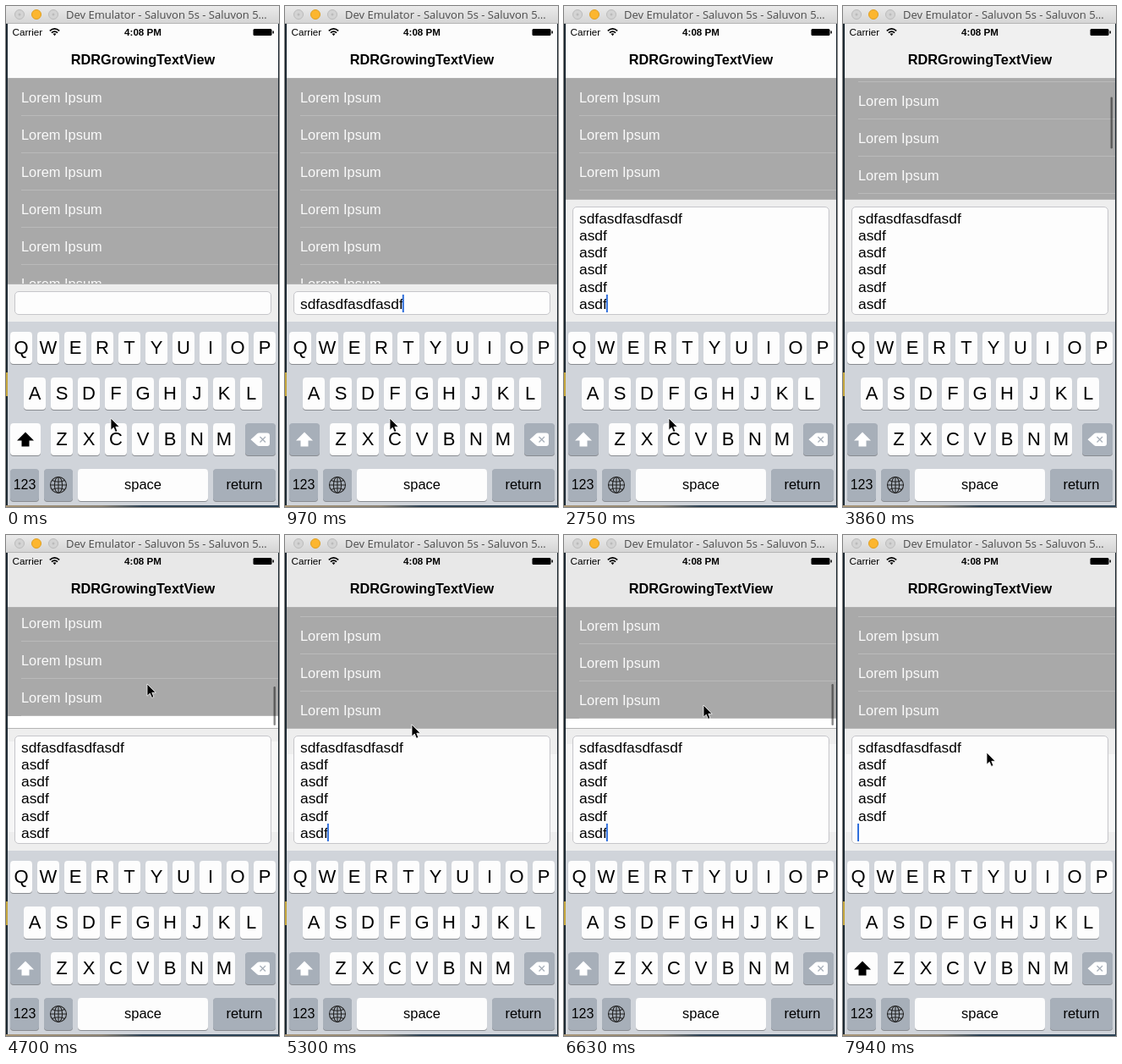
Animation of 323 by 592 pixels, one loop 8000 ms. Source, as an HTML page:

```html
<!DOCTYPE html>
<html lang="en">
<head>
<meta charset="utf-8">
<title>Growing text view</title>
<style>
  html, body { margin: 0; width: 100%; height: 100%; overflow: hidden; }
  svg { display: block; width: 323px; height: 592px; font-family: "Liberation Sans", Arial, sans-serif; }
  text { white-space: pre; }
  .mid { text-anchor: middle; }
</style>
</head>
<body>
<svg id="stage" viewBox="0 0 323 592">
  <defs>
    <linearGradient id="chrome" x2="0" y2="1">
      <stop stop-color="#ebebeb"/><stop offset="1" stop-color="#d5d5d5"/>
    </linearGradient>
    <linearGradient id="desk">
      <stop stop-color="#a99678"/><stop offset=".35" stop-color="#8b8272"/><stop offset=".5" stop-color="#2b4154"/>
    </linearGradient>
    <clipPath id="view"><rect id="viewBox" x="2" y="86" width="320"/></clipPath>
  </defs>
  <rect width="323" height="592" fill="#1c2831"/>
  <rect y="433" width="2" height="28" fill="#c4a53c"/>
  <rect y="590" width="323" height="2" fill="url(#desk)"/>
  <rect x="2" y="20" width="320" height="570" fill="#fff"/>

  <g clip-path="url(#view)"><g id="list"></g></g>
  <rect id="thumb" x="316.5" width="2.5" rx="1.25" fill="#000" opacity=".45"/>

  <rect id="nav" x="2" y="20" width="320" height="65"/>
  <rect x="2" y="85" width="320" height="1" fill="#b0b0b0"/>
  <text x="7.5" y="35" font-size="11.7">Carrier</text>
  <g fill="none" stroke="#000" stroke-width="1.7">
    <path d="M51.8 29.3Q57.5 24.5 63.2 29.3M53.9 31.7Q57.5 28.7 61.1 31.7"/>
    <path d="M55.5 32.8Q57.5 31.6 59.5 32.8L57.5 35.2Z" fill="#000" stroke="none"/>
  </g>
  <text class="mid" x="162" y="35" font-size="11.6" font-weight="bold">4:08 PM</text>
  <rect x="292.5" y="27" width="22" height="8" rx="1.5"/>
  <rect x="315.4" y="29.5" width="1.5" height="3"/>
  <text class="mid" x="162" y="69" font-size="16.3" font-weight="bold">RDRGrowingTextView</text>

  <rect width="323" height="20" fill="url(#chrome)"/>
  <rect y="20" width="323" height="1" fill="#b5b5b5"/>
  <circle cx="16" cy="10" r="5.5" fill="#d3d3d3" stroke="#bcbcbc"/>
  <circle cx="36" cy="10" r="5.5" fill="#fcb62f" stroke="#dfa023"/>
  <circle cx="56" cy="10" r="5.5" fill="#d3d3d3" stroke="#bcbcbc"/>
  <circle cx="16" cy="10" r="1.5" fill="#bbb"/>
  <circle cx="56" cy="10" r="1.5" fill="#bbb"/>
  <text x="71" y="15" font-size="13" fill="#4b4b4b" style="font-family:'Open Sans',sans-serif">Dev Emulator - Saluvon 5s - Saluvon 5…</text>

  <rect id="bar" x="2" width="320" fill="#eee"/>
  <rect id="glow" x="2" width="320" fill="#f6f6f6"/>
  <rect id="barLine" x="2" width="320" height="1" fill="#b4b4b4"/>
  <rect id="field" x="10.5" width="303" rx="4.5" fill="#fdfdfd" stroke="#c6c6ca"/>
  <g id="lines" font-size="17.4"></g>
  <rect id="caret" y="341" width="2" height="21" fill="#2f6fdc"/>

  <rect x="2" y="373" width="320" height="217" fill="#d0d4da"/>
  <g id="keys"></g>
  <path id="arrow" d="M23 503.5L33 513.5H27.5V520.5H18.5V513.5H13Z"/>
  <path d="M289.5 512.3L297 505.5Q298 504.5 299.5 504.5H309Q312 504.5 312 507.5V517Q312 520 309 520H299.5Q298 520 297 519Z" fill="#fff"/>
  <path d="M300.5 509L307 515.5M307 509L300.5 515.5" stroke="#a7afb9" stroke-width="1.3"/>
  <g fill="none" stroke="#222" stroke-width="1.1">
    <circle cx="62" cy="566" r="9.5"/><ellipse cx="62" cy="566" rx="4.6" ry="9.5"/>
    <path d="M62 556.5V575.5M52.5 566H71.5M54.5 560.5Q62 564 69.5 560.5M54.5 571.5Q62 568 69.5 571.5"/>
  </g>
  <path id="mouse" d="M0 0V14.2L3.3 11.2L5.5 16.4L7.9 15.4L5.8 10.3H10.2Z" stroke="#fff" stroke-width=".8"/>
</svg>
<script>
const LOOP = 8000, TOP = 86, ROW = 44, ROWS = 8, REST = 209;
const $ = id => document.getElementById(id);

function add(parent, tag, attrs, content = '') {
  const node = document.createElementNS('http://www.w3.org/2000/svg', tag);
  set(node, attrs);
  node.textContent = content;
  return parent.appendChild(node);
}
function set(node, attrs) {
  for (const name in attrs) node.setAttribute(name, attrs[name]);
}
const show = (node, on) => set(node, { visibility: on ? 'visible' : 'hidden' });
const within = (t, a, b) => t >= a && t < b;
const progress = (t, a, b) => Math.min(1, Math.max(0, (t - a) / (b - a)));
const smooth = k => k * k * (3 - 2 * k);

add($('list'), 'rect', { x: 2, width: 320, height: ROW * ROWS, fill: '#a9a9a9' });
for (let y = 0; y < ROW * ROWS; y += ROW) {
  add($('list'), 'rect', { x: 18, y: y + 43, width: 304, height: 1, fill: '#bababa' });
  add($('list'), 'text', { x: 18, y: y + 27.5, 'font-size': 16.4, fill: '#fafafa' }, 'Lorem Ipsum');
}

const WHITE = '#fdfdfd', GRAY = '#a7afb9';
function key(x, y, width, label, fill = WHITE, size = 22) {
  add($('keys'), 'rect', { x, y: y + 1, width, height: 38, rx: 4, fill: '#898c91' });
  const face = add($('keys'), 'rect', { x, y, width, height: 38, rx: 4, fill });
  add($('keys'), 'text', { class: 'mid', x: x + width / 2, y: y + 18.5 + size * .36, 'font-size': size }, label);
  return face;
}
['QWERTYUIOP', 'ASDFGHJKL', 'ZXCVBNM'].forEach((row, r) =>
  [...row].forEach((letter, i) => key(162 - 16 * row.length + 3 + 32 * i, 385 + 54 * r, 26, letter)));
const shiftKey = key(5, 493, 36, '');
key(283, 493, 36, '', GRAY);
key(5, 547, 34, '123', GRAY, 16);
key(45, 547, 34, '', GRAY);
key(85, 547, 154, 'space', WHITE, 16.5);
key(245, 547, 74, 'return', GRAY, 16.5);

const lineNodes = Array.from({ length: 6 }, () => add($('lines'), 'text', { x: 18 }));

// Typing comes in bursts of evenly spaced strokes
const strokes = [];
const type = (start, gap, text) =>
  [...text].forEach((char, i) => strokes.push({ char, time: start + gap * i }));
type(20, 75, 'sdf');
type(340, 57, 'asdf'.repeat(3));
type(1510, 0, '\n');
for (let line = 0; line < 5; line++) type(1680 + 235 * line, 43, line < 4 ? 'asdf\n' : 'asdf');

function textAt(t) {
  const typed = strokes.filter(s => s.time <= t).map(s => s.char).join('');
  const deleted = Math.min(4, Math.max(0, Math.floor((t - 7550) / 130) + 1));
  return typed.slice(0, typed.length - deleted);
}

// Pull past the end, then spring back
const pull = (t, start, peak, end, height) =>
  height * (t < peak ? smooth(progress(t, start, peak)) : (1 - progress(t, peak, end)) ** 2);
const overscroll = t => pull(t, 4590, 4920, 5280, 58) + pull(t, 6000, 6200, 7000, 56);
const scroll = t => REST * smooth(progress(t, 3630, 4460)) + overscroll(t);

const mousePath = [
  [2990, 124, 487], [3480, 146, 107], [4490, 155, 207], [4700, 167, 176], [4920, 150, -14],
  [5280, 150, 224], [5830, 151, 203], [6000, 151, 203], [6150, 141, -14],
  [6630, 165, 201], [7160, 170, 257]
];
function mouseAt(t) {
  const next = mousePath.findIndex(point => point[0] > t);
  const b = mousePath.at(next), a = next > 0 ? mousePath[next - 1] : b;
  const k = a === b ? 0 : smooth(progress(t, a[0], b[0]));
  return [a[1] + (b[1] - a[1]) * k, a[2] + (b[2] - a[2]) * k];
}

function drawList(t, barTop) {
  const offset = Math.round(scroll(t));
  const over = Math.max(0, offset - REST);
  set($('viewBox'), { height: barTop - TOP });
  set($('list'), { transform: `translate(0 ${TOP - offset})` });

  const shade = Math.round(252 - 20 * Math.min(1, offset / 65));
  set($('nav'), { fill: `rgb(${shade},${shade},${shade})` });

  const size = 61 - over;
  set($('thumb'), { y: over ? 225 - size : 94 + 70 * offset / REST, height: size });
  show($('thumb'), within(t, 3660, 5300) || within(t, 6000, 7160));

  const lightTop = Math.max(barTop, TOP + ROWS * ROW - offset + 30);
  set($('glow'), { y: lightTop, height: Math.max(0, 351 - lightTop) });
}

function drawInput(t, lines, barTop) {
  const last = lines.length - 1;
  set($('bar'), { y: barTop, height: 373 - barTop });
  set($('barLine'), { y: barTop - 1 });
  set($('field'), { y: barTop + 8.5, height: 356 - barTop });
  lineNodes.forEach((node, i) => {
    node.textContent = lines[i] || '';
    set(node, { y: 358 - 20.3 * (last - i) });
  });
  const width = lines[last] ? lineNodes[last].getComputedTextLength() : 0;
  set($('caret'), { x: 17 + width });
  show($('caret'), t >= 20 && !within(t, 3200, 4900) && !within(t, 5330, 5700));

  const shiftOn = !lines[last];
  set(shiftKey, { fill: shiftOn ? WHITE : GRAY });
  set($('arrow'), { fill: shiftOn ? '#000' : '#fff' });
}

function draw(t) {
  const lines = textAt(t).split('\n');
  const barTop = 349 - 20 * lines.length;
  drawList(t, barTop);
  drawInput(t, lines, barTop);
  set($('mouse'), { transform: `translate(${mouseAt(t)})` });
  show($('mouse'), !within(t, 3660, 4490));
}

const start = performance.now();
function tick() {
  draw((performance.now() - start) % LOOP);
  requestAnimationFrame(tick);
}
tick();
</script>
</body>
</html>
```
